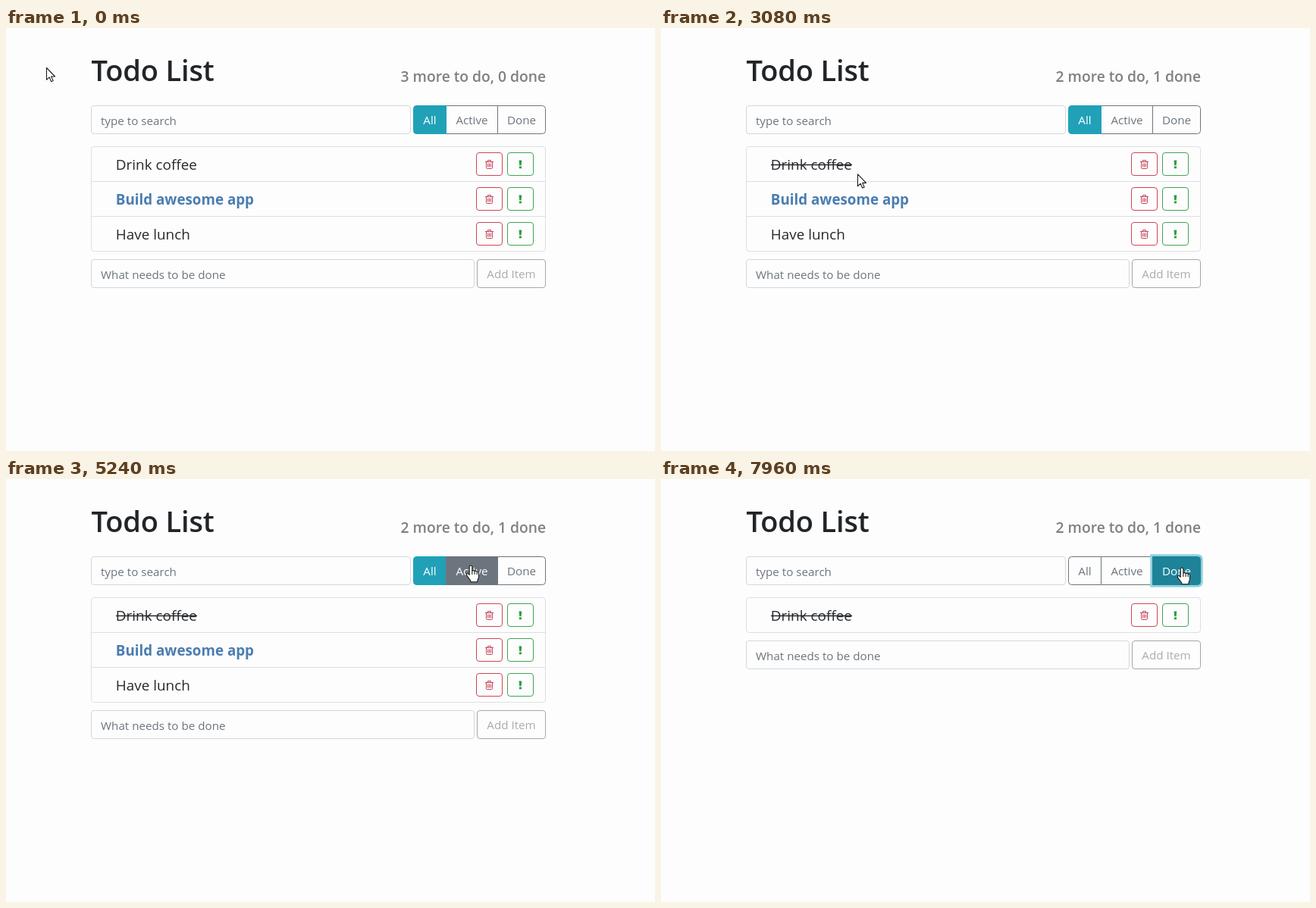
Animation of 856x558 px, one loop 8 s. Source, as an HTML page:

```html
<!DOCTYPE html>
<html lang="en">
<head>
<meta charset="utf-8">
<title>Todo List</title>
<style>
  html, body { margin: 0; width: 100%; height: 100%; overflow: hidden; background: #fdfdfd; }
  svg { display: block; width: 100vw; height: 100vh; font: 15.2px "Open Sans", "Noto Sans", sans-serif; fill: #6c757d; }
  .field { fill: none; stroke: #d3d7dc; }
  .list { fill: none; stroke: #dedfe2; }
  .title { font-size: 38px; font-weight: 600; letter-spacing: -.15px; fill: #212529; }
  .status { font-size: 19.25px; font-weight: 600; text-anchor: end; fill: #808080; }
  .item { font-size: 18.9px; fill: #25292d; }
  .strong { font-size: 18.8px; font-weight: 700; fill: #4a7db0; }
  .mid { text-anchor: middle; }
  .trash { fill: none; stroke: #c4455a; }
  .bang { fill: #28a03f; }
  .cursor { fill: #fff; stroke: #1c1c1c; stroke-width: 1.1; stroke-linejoin: round; }
</style>
</head>
<body>
<svg id="stage" viewBox="0 0 856 558"></svg>
<script>
const LOOP = 8000, FADE = 150;
const CHECK = 1720, PICK_ACTIVE = 5480, PICK_DONE = 7400;
const stage = document.getElementById('stage');

function add(parent, tag, attrs = {}, text) {
  const el = document.createElementNS('http://www.w3.org/2000/svg', tag);
  for (const key in attrs) el.setAttribute(key, attrs[key]);
  if (text) el.textContent = text;
  parent.append(el);
  return el;
}
const group = (parent = stage, attrs) => add(parent, 'g', attrs);
const label = (parent, x, y, text, cls = '') => add(parent, 'text', { x, y, class: cls }, text);
const box = (parent, x, y, width, height, attrs) =>
  add(parent, 'rect', { x, y, width, height, rx: 3.5, ...attrs });
const show = (el, on) => el.setAttribute('display', on ? 'inline' : 'none');

// Header and search
label(stage, 112.5, 70, 'Todo List', 'title');
const status = label(stage, 712, 71, '', 'status');
box(stage, 112.5, 102.5, 421, 37, { class: 'field' });
label(stage, 125, 128, 'type to search');

// List
const listBox = box(stage, 112.5, 156.5, 599, 138, { class: 'list' });
const rows = ['Drink coffee', 'Build awesome app', 'Have lunch'].map((text, i) => {
  const g = group();
  const divider = add(g, 'path', { d: 'M113 .5H711', class: 'list' });
  label(g, 144.8, 30.5, text, i === 1 ? 'item strong' : 'item');
  box(g, 620.5, 8.5, 34, 30, { fill: 'none', stroke: '#cf4557' });
  add(g, 'path', {
    class: 'trash',
    d: 'M632 20.5H643M635.5 20V18.5H639.5V20M633.5 21V28.5Q633.5 29.5 634.5 29.5H640.5Q641.5 29.5 641.5 28.5V21M635.6 22.5V27.5M637.5 22.5V27.5M639.4 22.5V27.5'
  });
  box(g, 661.5, 8.5, 34, 30, { fill: 'none', stroke: '#3fa558' });
  add(g, 'path', { class: 'bang', d: 'M676.5 18.5H680.3L679.6 25.3H677.2ZM676.8 26.4H680V29.2H676.8Z' });
  return { g, divider };
});
const strike = add(rows[0].g, 'path', { d: 'M145 24.5H252', stroke: '#25292d', 'stroke-width': 1.6 });

// New item form
const form = group();
box(form, 112.5, .5, 505, 37, { class: 'field' });
label(form, 125, 26, 'What needs to be done');
box(form, 621.5, .5, 90, 37, { fill: 'none', stroke: '#a3a8ad' });
label(form, 666.5, 25, 'Add Item', 'mid').setAttribute('fill', '#a8acaf');

// Filter buttons: [fill, text, border] for each look
const LOOKS = {
  off: [[253, 253, 253], [108, 117, 125], [108, 117, 125]],
  hover: [[108, 117, 125], [255, 255, 255], [108, 117, 125]],
  on: [[32, 161, 184], [255, 255, 255], [32, 161, 184]],
  press: [[30, 131, 152], [255, 255, 255], [30, 131, 152]]
};
const filters = group();
function filter(text, x, w, d, changes) {
  const g = group(filters);
  const glow = add(g, 'path', { d, fill: 'none', stroke: '#8fd2de', 'stroke-width': 6.4 });
  const face = add(g, 'path', { d });
  const name = label(g, x + w / 2, 127, text, 'mid');
  return { g, glow, face, name, changes };
}
const all = filter('All', 537, 44, 'M580.5 102.5V139.5H541.5Q537.5 139.5 537.5 135.5V106.5Q537.5 102.5 541.5 102.5Z',
  [[-FADE, 'on'], [PICK_ACTIVE, 'off']]);
const active = filter('Active', 580, 69, 'M580.5 102.5H648.5V139.5H580.5Z',
  [[-FADE, 'off'], [4650, 'hover'], [PICK_ACTIVE, 'press'], [6350, 'on'], [PICK_DONE, 'off']]);
const done = filter('Done', 648, 64, 'M648.5 102.5H707.5Q711.5 102.5 711.5 106.5V135.5Q711.5 139.5 707.5 139.5H648.5Z',
  [[-FADE, 'off'], [4500, 'hover'], [4650, 'off'], [6350, 'hover'], [PICK_DONE, 'press']]);

function paint(b, t) {
  let i = b.changes.length - 1;
  while (b.changes[i][0] > t) i--;
  const [start, look] = b.changes[i];
  const from = LOOKS[b.changes[Math.max(0, i - 1)][1]];
  const k = Math.min(1, (t - start) / FADE);
  const [fill, ink, edge] = LOOKS[look].map((c, n) =>
    `rgb(${c.map((v, j) => Math.round(from[n][j] + (v - from[n][j]) * k))})`);
  b.face.setAttribute('fill', fill);
  b.face.setAttribute('stroke', edge);
  b.name.setAttribute('fill', ink);
  b.raised = look !== 'off';
}

// Pointer
const arrow = add(stage, 'path', { class: 'cursor', d: 'M.5 .5V16.3L4.2 12.9 6.7 18.7 9.2 17.6 6.7 12H11.6Z' });
const hand = add(stage, 'path', {
  class: 'cursor',
  d: 'M-1.8 12.5V1.8A1.8 1.8 0 0 1 1.8 1.8V8Q2.1 6.4 3.6 6.6 5.1 6.7 5.1 8.2 5.5 7 6.8 7.2 8.2 7.4 8.2 9 8.7 8.1 9.5 8.3 10.5 8.6 10.5 10.3V14.5Q10.5 16.6 9.3 18.6L8.6 21.8H-.2V20L-5.3 13.2Q-6.2 11.2-4.9 10.6-3.5 10.3-1.8 12.5ZM1.8 8V12M5.1 8.5V12M8.2 9V12.2'
});
const PATH = [
  [0, 53, 52], [240, 53, 52], [880, 110, 104], [1440, 219, 181], [2700, 219, 181],
  [3700, 342, 216], [4000, 342, 216], [4260, 470, 205], [4500, 672, 140], [4570, 674, 127],
  [4650, 648, 117], [4720, 613, 109], [4960, 613, 114], [6160, 613, 114],
  [6560, 692, 119], [6720, 687, 117], [LOOP, 687, 117]
];
// Slope at a key; zero where the pointer rests or turns back
function slope(i, axis) {
  const a = PATH[i - 1], b = PATH[i], c = PATH[i + 1];
  if (!a || !c || (b[axis] - a[axis]) * (c[axis] - b[axis]) <= 0) return 0;
  return (c[axis] - a[axis]) / (c[0] - a[0]);
}
function pointer(t) {
  let i = 0;
  while (i < PATH.length - 2 && PATH[i + 1][0] <= t) i++;
  const a = PATH[i], b = PATH[i + 1], span = b[0] - a[0], u = (t - a[0]) / span;
  return [1, 2].map(n => {
    const s = u * u * (3 - 2 * u);
    return a[n] + (b[n] - a[n]) * s +
      span * (slope(i, n) * u * (1 - u) ** 2 - slope(i + 1, n) * u * u * (1 - u));
  });
}
function clickable(x, y) {
  const inside = (l, top, r, bottom) => x >= l && x <= r && y >= top && y <= bottom;
  return inside(537, 102, 712, 140) || inside(145, 165, 252, 195) || inside(145, 211, 328, 241);
}

function draw(t) {
  status.textContent = t < CHECK ? '3 more to do, 0 done' : '2 more to do, 1 done';
  show(strike, t >= CHECK);

  const visible = t < PICK_ACTIVE ? [0, 1, 2] : t < PICK_DONE ? [1, 2] : [0];
  rows.forEach((row, i) => {
    const at = visible.indexOf(i);
    show(row.g, at >= 0);
    show(row.divider, at > 0);
    row.g.setAttribute('transform', `translate(0 ${156 + 46 * Math.max(0, at)})`);
  });
  listBox.setAttribute('height', 46 * visible.length);
  form.setAttribute('transform', `translate(0 ${167 + 46 * visible.length})`);

  const buttons = [all, active, done];
  buttons.forEach(b => paint(b, t));
  show(all.glow, false);
  show(active.glow, t >= PICK_ACTIVE && t < PICK_DONE);
  show(done.glow, t >= PICK_DONE);
  buttons.filter(b => !b.raised).concat(buttons.filter(b => b.raised)).forEach(b => filters.append(b.g));

  const [x, y] = pointer(t), over = clickable(x, y);
  show(hand, over);
  show(arrow, !over);
  (over ? hand : arrow).setAttribute('transform', `translate(${x.toFixed(2)} ${y.toFixed(2)})`);
}

const begin = performance.now();
function tick() {
  draw((performance.now() - begin) % LOOP);
  requestAnimationFrame(tick);
}
tick();
</script>
</body>
</html>
```
